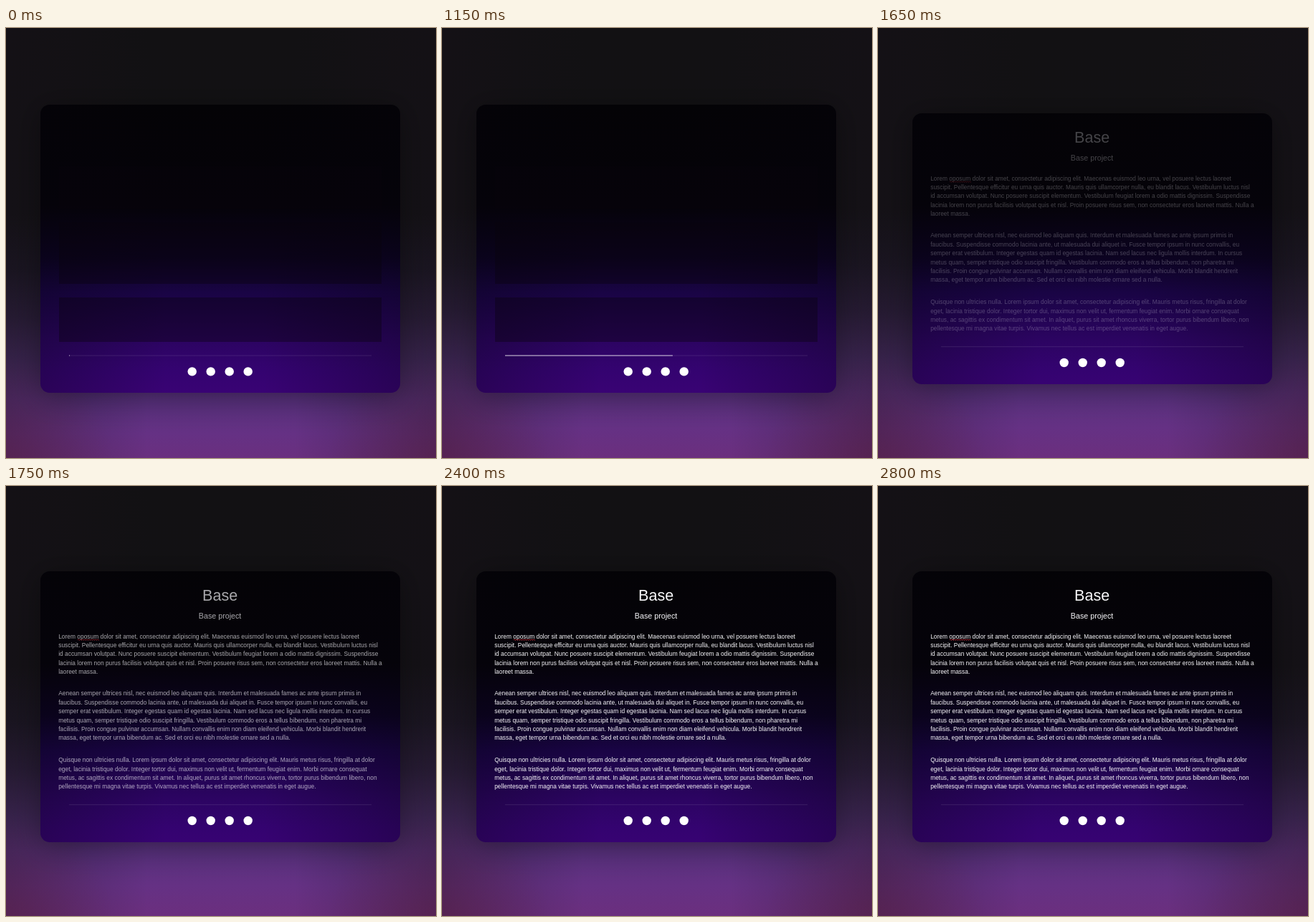
These frames come from a looping animation (600x600 px, 2.85 s). An HTML page with a canvas:

```html
<!DOCTYPE html>
<html lang="en">
<head>
<meta charset="utf-8">
<title>Base</title>
<style>
html, body { margin: 0; width: 100%; height: 100%; overflow: hidden; background: #121113; }
canvas { display: block; width: 600px; height: 600px; }
</style>
</head>
<body>
<canvas id="stage" width="600" height="600"></canvas>
<script>
const ctx = document.getElementById('stage').getContext('2d');
const LOOP = 2850, STEP = 50, REVEAL = 1600;
const FACE = '"Liberation Sans", Arial, sans-serif';

const paragraphs = [
  { y: 212.6, lines: [
    'Lorem oposum dolor sit amet, consectetur adipiscing elit. Maecenas euismod leo urna, vel posuere lectus laoreet',
    'suscipit. Pellentesque efficitur eu urna quis auctor. Mauris quis ullamcorper nulla, eu blandit lacus. Vestibulum luctus nisl',
    'id accumsan volutpat. Nunc posuere suscipit elementum. Vestibulum feugiat lorem a odio mattis dignissim. Suspendisse',
    'lacinia lorem non purus facilisis volutpat quis et nisl. Proin posuere risus sem, non consectetur eros laoreet mattis. Nulla a',
    'laoreet massa.'] },
  { y: 292.4, lines: [
    'Aenean semper ultrices nisl, nec euismod leo aliquam quis. Interdum et malesuada fames ac ante ipsum primis in',
    'faucibus. Suspendisse commodo lacinia ante, ut malesuada dui aliquet in. Fusce tempor ipsum in nunc convallis, eu',
    'semper erat vestibulum. Integer egestas quam id egestas lacinia. Nam sed lacus nec ligula mollis interdum. In cursus',
    'metus quam, semper tristique odio suscipit fringilla. Vestibulum commodo eros a tellus bibendum, non pharetra mi',
    'facilisis. Proin congue pulvinar accumsan. Nullam convallis enim non diam eleifend vehicula. Morbi blandit hendrerit',
    'massa, eget tempor urna bibendum ac. Sed et orci eu nibh molestie ornare sed a nulla.'] },
  { y: 385.3, lines: [
    'Quisque non ultricies nulla. Lorem ipsum dolor sit amet, consectetur adipiscing elit. Mauris metus risus, fringilla at dolor',
    'eget, lacinia tristique dolor. Integer tortor dui, maximus non velit ut, fermentum feugiat enim. Morbi ornare consequat',
    'metus, ac sagittis ex condimentum sit amet. In aliquet, purus sit amet rhoncus viverra, tortor purus bibendum libero, non',
    'pellentesque mi magna vitae turpis. Vivamus nec tellus ac est imperdiet venenatis in eget augue.'] }
];

const clamp = v => Math.max(0, Math.min(1, v));
const easeOut = p => 1 - (1 - clamp(p)) ** 2;

function linear(x0, y0, x1, y1, stops) {
  const g = ctx.createLinearGradient(x0, y0, x1, y1);
  stops.forEach(([at, color]) => g.addColorStop(at, color));
  return g;
}

function fill(style, x, y, w, h) {
  ctx.fillStyle = style;
  ctx.fillRect(x, y, w, h);
}

// Large type scaled down keeps the advances linear.
function text(str, x, y, size, align = 'left') {
  ctx.save();
  ctx.translate(x, y);
  ctx.scale(0.1, 0.1);
  ctx.font = `${size * 10}px ${FACE}`;
  ctx.textAlign = align;
  ctx.fillText(str, 0, 0);
  ctx.restore();
}

function background(t) {
  const drop = 8 * (1 - easeOut(t / 900));
  fill(linear(0, drop, 0, 600 + drop, [
    [0, '#121113'], [0.42, '#121114'], [0.55, '#1a1623'], [0.66, '#2b1e3c'],
    [0.77, '#452a61'], [0.85, '#57307c'], [0.93, '#653184'], [1, '#6b2f7e']
  ]), 0, 0, 600, 600);
  const dark = 'rgba(24,17,26,.34)', none = 'rgba(24,17,26,0)';
  fill(linear(0, 0, 600, 0, [[0, dark], [0.33, none], [0.67, none], [1, dark]]), 0, 0, 600, 600);
  for (const x of [0, 600]) {
    const g = ctx.createRadialGradient(x, 610, 0, x, 610, 150);
    g.addColorStop(0, 'rgba(105,30,55,.3)');
    g.addColorStop(1, 'rgba(105,30,55,0)');
    fill(g, 0, 450, 600, 150);
  }
}

function card(top, bottom) {
  ctx.save();
  ctx.beginPath();
  ctx.roundRect(48, top, 502, bottom - top, 13);
  ctx.shadowColor = 'rgba(0,0,0,.36)';
  ctx.shadowBlur = 40;
  ctx.shadowOffsetY = 6;
  ctx.fillStyle = linear(0, 107, 0, 509, [
    [0, '#040306'], [0.35, '#050309'], [0.53, '#0c0321'], [0.65, '#190444'],
    [0.82, '#2c0462'], [0.92, '#340370'], [1, '#390374']
  ]);
  ctx.fill();
  ctx.shadowColor = 'transparent';
  ctx.clip();
  const dark = 'rgba(5,3,12,.28)', none = 'rgba(5,3,12,0)';
  fill(linear(48, 0, 550, 0, [[0, dark], [0.35, none], [0.62, none], [1, dark]]), 48, top, 502, bottom - top);
  ctx.restore();
}

function footer(y) {
  fill('rgba(255,255,255,.1)', 88, y, 422, 1);
  ctx.fillStyle = '#fff';
  for (let i = 0; i < 4; i++) {
    ctx.beginPath();
    ctx.arc(259.7 + i * 26, y + 22.8, 6.2, 0, Math.PI * 2);
    ctx.fill();
  }
}

function loading(t) {
  card(107, 509);
  for (const [y, h] of [[193, 59], [271, 86], [376, 62]]) fill('rgba(8,3,12,.38)', 74, y, 450, h);
  footer(456.6);
  const progress = clamp(t / 1400) ** 3;
  const alpha = 0.55 * (1 - clamp((t - 1400) / 180));
  fill(`rgba(255,255,255,${alpha})`, 88, 456.4, Math.max(1, 422 * progress), 1.4);
}

function squiggle() {
  ctx.beginPath();
  for (let x = 100; x <= 130; x += 0.5) ctx.lineTo(x, 214.5 + 0.7 * Math.sin(x * 2.1));
  ctx.strokeStyle = '#d8343c';
  ctx.lineWidth = 0.8;
  ctx.stroke();
}

function article(t) {
  card(119, 497);
  footer(444.2);
  ctx.save();
  ctx.globalAlpha = easeOut((t - REVEAL) / 350);
  ctx.fillStyle = '#f8f8fa';
  text('Base', 298.7, 160.2, 21.6, 'center');
  text('Base project', 298.6, 185.2, 10.7, 'center');
  for (const { y, lines } of paragraphs) {
    lines.forEach((line, i) => text(line, 73.2, y + i * 12.37, 8.39));
  }
  squiggle();
  ctx.restore();
}

function draw(now) {
  const t = Math.floor((now % LOOP) / STEP) * STEP;
  background(t);
  if (t < REVEAL) loading(t);
  else article(t);
}

const start = performance.now();
function tick() {
  draw(performance.now() - start);
  requestAnimationFrame(tick);
}
tick();
</script>
</body>
</html>
```
